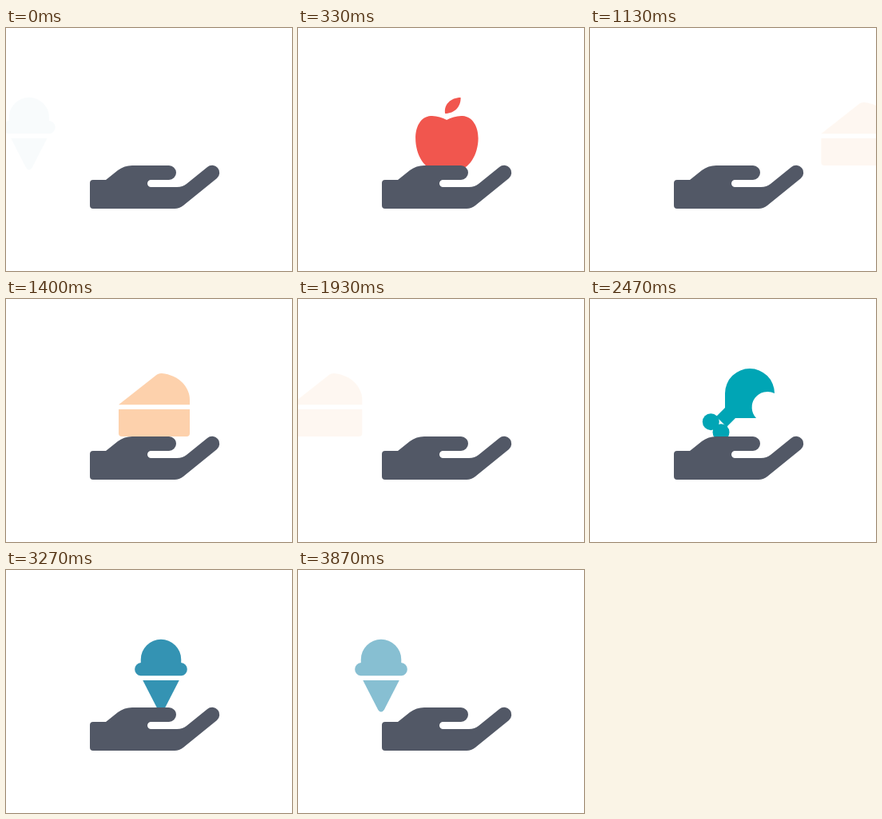
An HTML page that plays this animation: 358x304 px, repeating every 3940 ms.

```html
<!DOCTYPE html>
<html lang="en">
<head>
<meta charset="utf-8">
<title>Hand offering food</title>
<style>
  html, body { margin: 0; width: 100%; height: 100%; overflow: hidden; background: #fff; }
  svg { display: block; width: 358px; height: 304px; }
</style>
</head>
<body>
<svg viewBox="0 0 358 304">
  <g class="food" fill="#f1524a">
    <g transform="translate(82)">
      <path d="M104 115C98 112 91 109.5 84 110C71 111 65 124 65 138C65 158 76 178 92 178C97 178 100 174 104.3 174C108 174 111 178 116 178C132 178 143.5 158 143.5 138C143.5 124 137 111 124 110C117 109.5 110 112 104 115Z"/>
      <path d="M102 107C100 96 109 87 121.5 87C122 98 114 107 102 107Z"/>
    </g>
  </g>
  <g class="food" fill="#fdd1ac">
    <path d="M141 132.3L189 94.5Q191.5 92.7 195 93C216 95 230 110 230 126V132.3Z"/>
    <path d="M141 138H230V168Q230 172 226 172H145Q141 172 141 168Z"/>
  </g>
  <g class="food" fill="#00a5b5">
    <path d="M231 118A31 31 0 0 0 169 118V136L158 147L171 160L182 149H208A19.6 19.6 0 0 1 231 118Z"/>
    <circle cx="151.3" cy="153.7" r="10.5"/>
    <circle cx="164" cy="166.7" r="10.5"/>
  </g>
  <g class="food" fill="#0f80a5">
    <g transform="translate(82)">
      <path d="M79 116V112A25.2 25.2 0 0 1 129.5 112V116A8.2 8.2 0 0 1 130 132.3H78.5A8.2 8.2 0 0 1 79 116Z"/>
      <path d="M81.5 138H127L108 175Q104.2 180 100.5 175Z"/>
    </g>
  </g>
  <path fill="#525866" d="M109 190H125L140 178Q148 172 158 172H204A9 9 0 0 1 204 190H181.5A4.5 4.5 0 0 0 181.5 199H214Q221 199 226 195L252 174A9 9 0 0 1 264 188L222 222Q217 226 211 226H109Q105 226 105 222V194Q105 190 109 190Z"/>
</svg>
<script>
  const LOOP = 3940, CYCLE = 4000, TURN = 1000, STEP = 1000 / 15, TRAVEL = 157.5;
  const foods = document.querySelectorAll('.food');

  // Ease in and out from 0 to 1, centred on t = 0
  function ease(t, half, power) {
    const q = Math.max(-1, Math.min(1, t / half));
    return q < 0 ? (1 + q) ** power / 2 : 1 - (1 - q) ** power / 2;
  }
  const slide = t => ease(t, 185, 5);
  const fade = t => ease(t, 209, 3);

  function draw(now) {
    // The motion runs at 15 steps per second
    const time = Math.floor((now % LOOP + 4) / STEP) * STEP;
    foods.forEach((food, i) => {
      const t = (time - i * TURN + CYCLE) % CYCLE;
      const x = TRAVEL * (1 - slide(t - 198) - slide(t - 865));
      food.setAttribute('transform', `translate(${x.toFixed(2)})`);
      food.setAttribute('opacity', (fade(t - 200) - fade(t - 866)).toFixed(3));
    });
  }

  const start = performance.now();
  function tick() {
    draw(performance.now() - start);
    requestAnimationFrame(tick);
  }
  tick();
</script>
</body>
</html>
```
